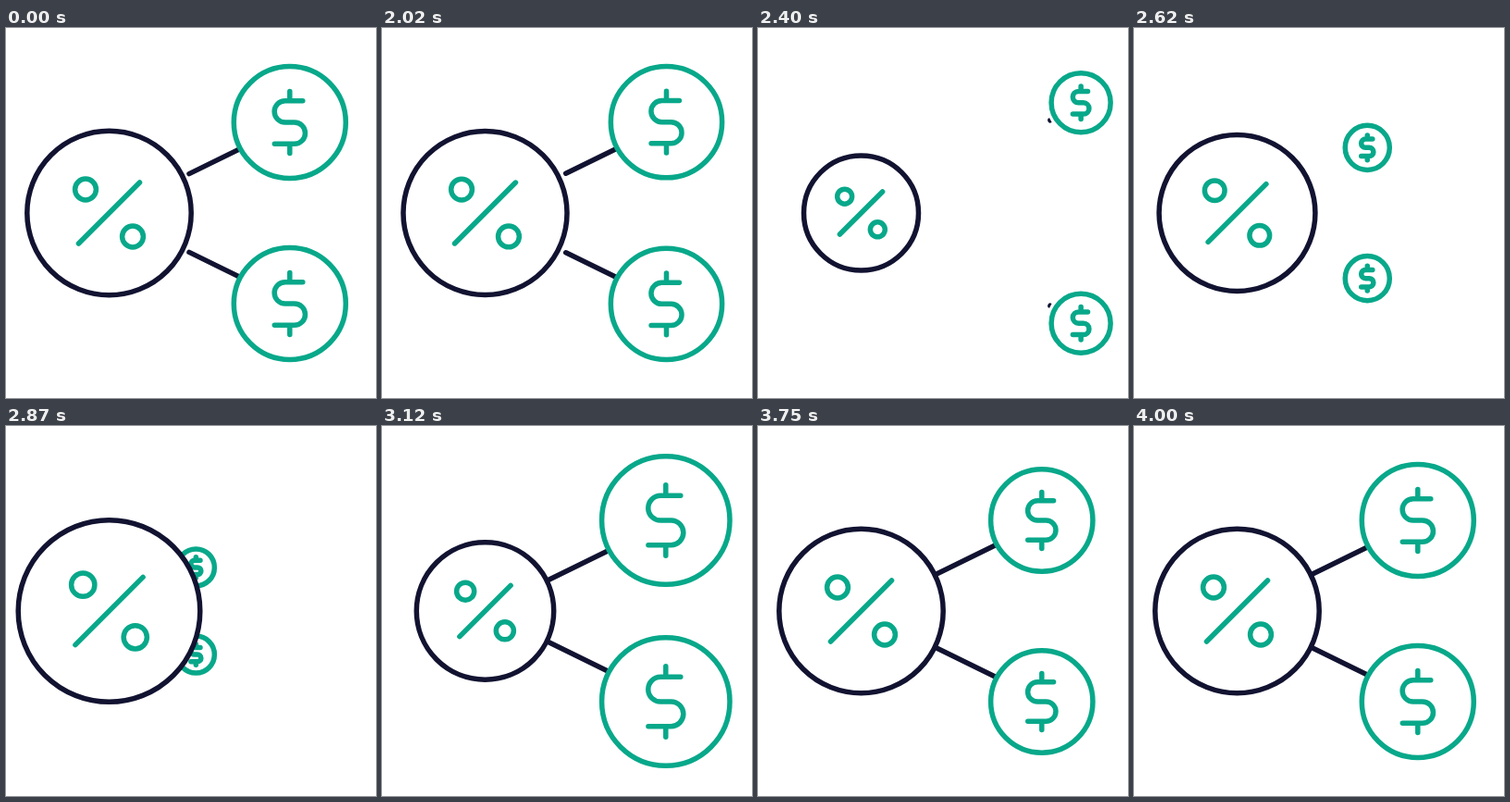
Animation, 400 px wide and 400 px high, one loop 4020 ms. Source, as an HTML page:

```html
<!DOCTYPE html>
<html lang="en">
<head>
<meta charset="utf-8">
<title>Revenue share</title>
<style>
  html, body { margin: 0; width: 100%; height: 100%; overflow: hidden; background: #fff; }
  svg { display: block; width: 400px; height: 400px; }
  svg * { vector-effect: non-scaling-stroke; }
  .ink { fill: none; stroke-width: 5.5; stroke-linecap: round; stroke-linejoin: round; }
  .dark { stroke: #121331; }
  .green { stroke: #08a88a; }
  .paper { fill: #fff; }
</style>
</head>
<body>
<svg viewBox="0 0 400 400">
  <defs>
    <g id="coin" class="ink green">
      <circle r="60.5" class="paper"/>
      <path d="M14 -23.3H-5a11.65 11.65 0 0 0 0 23.3H5a11.65 11.65 0 0 1 0 23.3H-16.5M0 -33.5V-23.3M0 23.3V33.5"/>
    </g>
  </defs>
  <g id="lines" class="ink dark"><path/><path/></g>
  <g id="halos" class="paper"><circle/><circle/></g>
  <g id="coins"><use href="#coin"/><use href="#coin"/></g>
  <g id="hub" class="ink">
    <circle r="88.7" class="dark paper"/>
    <g class="green">
      <circle cx="-25.5" cy="-25.5" r="11.4"/>
      <circle cx="25.5" cy="25.5" r="11.4"/>
      <path d="M-33 33L33 -33"/>
    </g>
  </g>
</svg>
<script>
const LOOP = 4020, HUB_X = 111.5, HUB_Y = 200, HUB_R = 88.7, COIN_R = 60.5;
const RETRACT_END = 2420, IMPACT = 2790, LINE_SLOPE = 0.49;

const smooth = p => (1 - Math.cos(Math.PI * p)) / 2;
const quadIn = p => p * p;
const quadOut = p => p * (2 - p);

// Keys are [time, value, easing towards this key].
const hubRadius = [[2000, HUB_R], [2400, 62], [2800, 100.5], [3200, 71.5], [3640, HUB_R]];
const coinRadius = [[2000, COIN_R], [2293, 33], [IMPACT, 12.4, quadIn], [3130, 69.3], [3520, 50.4], [4000, COIN_R]];
const coinReach = [[2000, 1], [2293, 1.277], [IMPACT, 0, quadIn], [3080, 1, quadOut]];
const retraction = [[2000, 0], [RETRACT_END, 1]];

function track(keys, t) {
  if (t <= keys[0][0]) return keys[0][1];
  for (let i = 1; i < keys.length; i++) {
    const [t0, v0] = keys[i - 1], [t1, v1, ease = smooth] = keys[i];
    if (t < t1) return v0 + (v1 - v0) * ease((t - t0) / (t1 - t0));
  }
  return keys[keys.length - 1][1];
}

const $ = id => document.getElementById(id);
const place = (el, x, y, s) => el.setAttribute("transform", `translate(${x} ${y}) scale(${s})`);

function draw(t) {
  const r = track(coinRadius, t), reach = track(coinReach, t), q = track(retraction, t);
  const x = HUB_X + 195.3 * reach;
  const retracting = t < RETRACT_END;
  const lineStart = retracting ? 198 + 118.5 * q : HUB_X;

  place($("hub"), HUB_X, HUB_Y, track(hubRadius, t) / HUB_R);
  $("lines").style.display = retracting || t > IMPACT ? "" : "none";
  $("halos").style.display = retracting ? "" : "none";

  [-1, 1].forEach((side, i) => {
    const y = HUB_Y + side * 98 * reach;
    const lineY = px => HUB_Y + side * LINE_SLOPE * (px - HUB_X);
    place($("coins").children[i], x, y, r / COIN_R);
    $("lines").children[i].setAttribute("d", `M${lineStart} ${lineY(lineStart)}L${x} ${lineY(x)}`);
    const halo = $("halos").children[i];
    halo.setAttribute("r", r + 6 * q);
    place(halo, x, y, 1);
  });
}

const begin = performance.now();
function frame() {
  draw((performance.now() - begin) % LOOP);
  requestAnimationFrame(frame);
}
draw(0);
requestAnimationFrame(frame);
</script>
</body>
</html>
```
